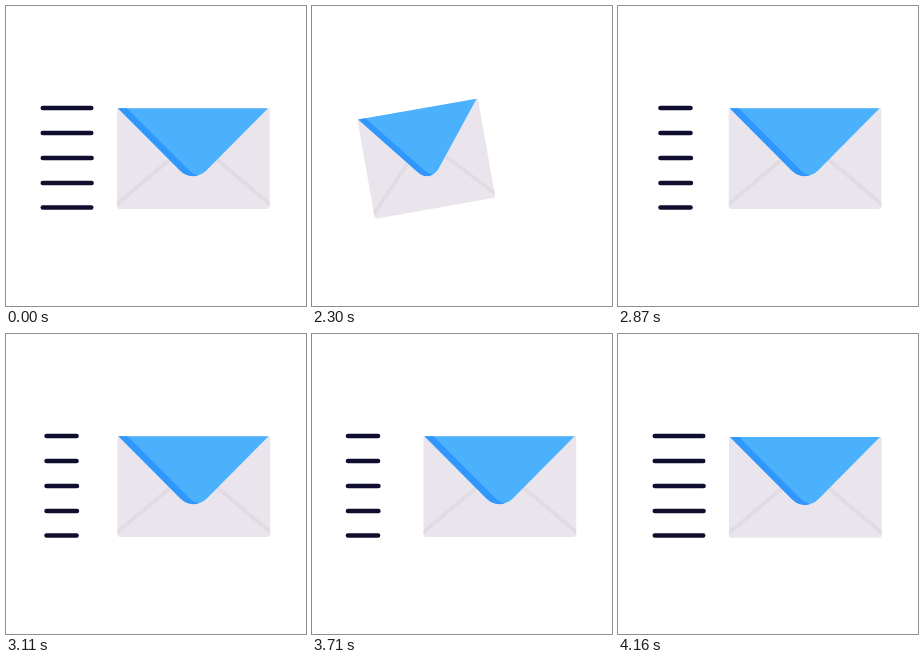
An HTML page that plays this animation: 300 by 300 pixels, repeating every 4220 ms.

```html
<!DOCTYPE html>
<html lang="en">
<head>
<meta charset="utf-8">
<title>Sending mail</title>
<style>
  html, body { margin: 0; width: 100%; height: 100%; overflow: hidden; background: #fff; }
  svg { display: block; width: 100vw; height: 100vh; }
</style>
</head>
<body>
<svg viewBox="0 0 300 300">
  <g id="streaks" stroke="#100e2f" stroke-width="4.6" stroke-linecap="round"></g>
  <g id="envelope">
    <path fill="#eae5ec" d="M111 102.3H263.7V200Q263.7 203 261 203H114Q111 203 111 200Z"/>
    <path fill="#e1dbe3" d="M111 195.5L164 151H170L111 200.5ZM263.7 195.5L211 151H205L263.7 200.5Z"/>
    <path fill="#4bb1fd" d="M112 102.3H262L200.3 164.5A18.6 18.6 0 0 1 174 164.5Z"/>
    <path fill="#3097fd" d="M112 102.3H121L183 164.3Q187 168.3 192.5 169.3A18.6 18.6 0 0 1 174 164.5Z"/>
  </g>
</svg>
<script>
  const LOOP = 4220, HOLD = 2030, STEP = 30, LAST = 72;
  const CENTER = { x: 187.5, y: 152.5 };
  const REST = [36.8, 85.2];
  const CAP = 2.3;
  const ROWS = [102, 127, 152, 177, 201.5];
  const RETURN = 14.6, EMERGE = 22, SETTLE = 65;

  const envelope = document.getElementById("envelope");
  const streaks = document.getElementById("streaks");
  const lines = ROWS.map(y => {
    const line = document.createElementNS("http://www.w3.org/2000/svg", "line");
    line.setAttribute("y1", y);
    line.setAttribute("y2", y);
    return streaks.appendChild(line);
  });

  const clamp = v => Math.min(1, Math.max(0, v));
  const ease = v => (1 - Math.cos(Math.PI * clamp(v))) / 2;
  const mix = (a, b, k) => a + (b - a) * k;

  // 0 at rest, 1 when fully drawn back
  function pull(n) {
    return n < RETURN ? 1 - 0.59 ** n : 1 - ease((n - RETURN) / 15);
  }

  // Ends of the streaks' centre lines, without the round caps
  function streakEnds(n) {
    const [left, right] = REST;
    if (n < RETURN) return [left, mix(right, left - 2 * CAP, pull(n))];
    const sway = Math.PI + (n - 29) * (Math.PI / 2 + 0.0195);
    const start = 42.5 + 12.5 * Math.sin(sway);
    const end = start + 30;
    const settle = ease((n - SETTLE) / (LAST - SETTLE));
    const length = 30 * ease((n - EMERGE) / 6);
    return [mix(end - length, left, settle), mix(end, right, settle)];
  }

  function drawEnvelope(n) {
    const p = pull(n);
    const shake = n > 29 ? 1 : 0;
    const turn = n * Math.PI / 2;
    const x = CENTER.x - 73.4 * p + shake * 0.5 * Math.sin(turn);
    const y = CENTER.y + shake * 0.7 * Math.cos(turn);
    envelope.setAttribute("transform",
      `translate(${x} ${y}) rotate(${-10 * p}) scale(${1 - 0.2 * p} 1) translate(${-CENTER.x} ${-CENTER.y})`);
  }

  function drawStreaks(n) {
    const [a, b] = streakEnds(n);
    const hidden = b - a < 0.5;
    lines.forEach((line, i) => {
      line.setAttribute("x1", a);
      line.setAttribute("x2", b + (i === 2 || i === 3 ? 0.4 : 0));
      line.setAttribute("visibility", hidden ? "hidden" : "visible");
    });
  }

  function draw(time) {
    const t = time % LOOP;
    const n = t < HOLD ? 0 : Math.min(LAST, Math.floor((t - HOLD) / STEP) + 1);
    drawEnvelope(n);
    drawStreaks(n);
  }

  const begin = performance.now();
  function tick() {
    draw(performance.now() - begin);
    requestAnimationFrame(tick);
  }
  tick();
</script>
</body>
</html>
```
